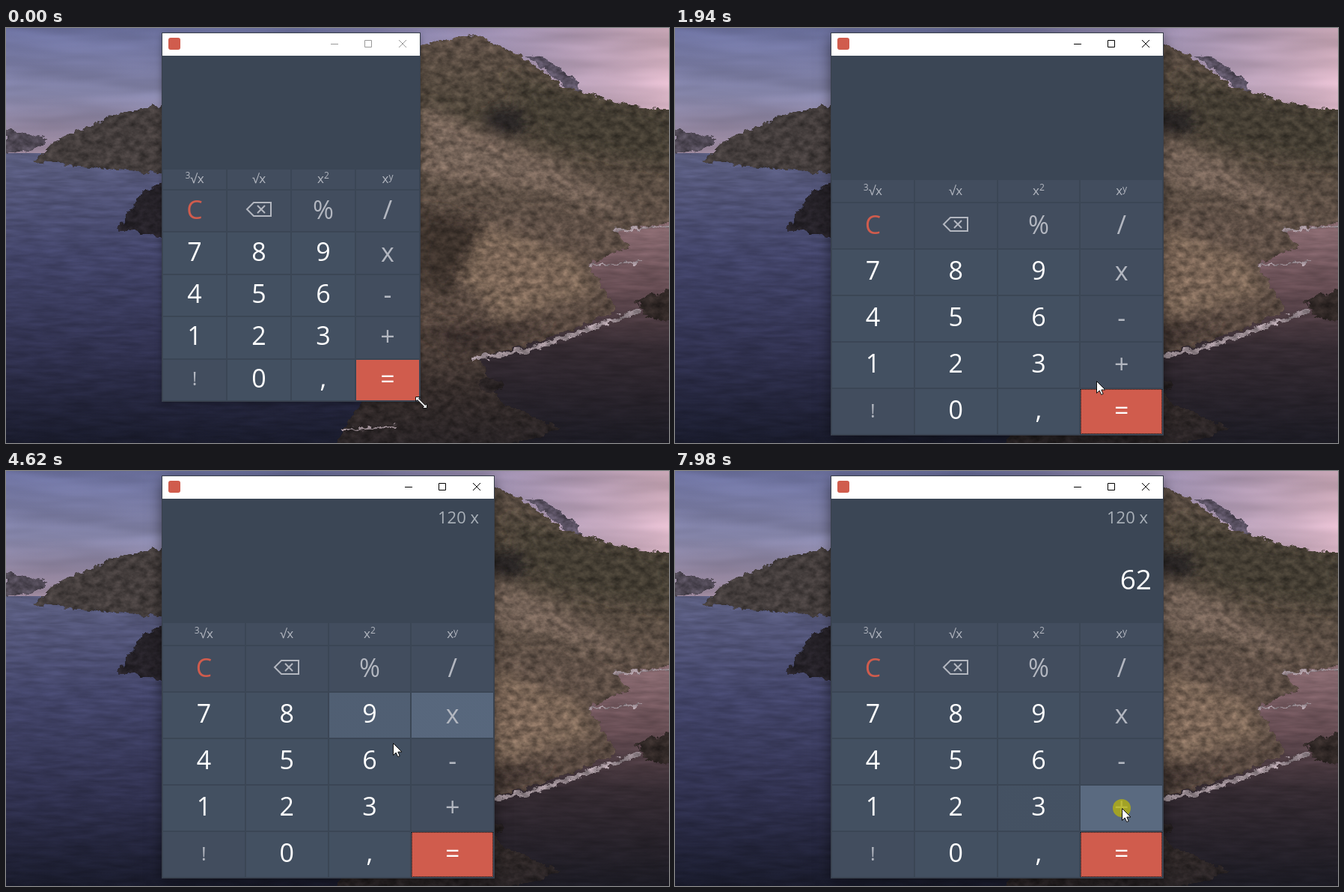
Recreate the animation shown at these times as an HTML page. Size 886 px wide and 554 px high, loop 8 s.

```html
<!DOCTYPE html>
<html lang="en">
<head>
<meta charset="utf-8">
<title>Calculator</title>
<style>
html, body { margin: 0; width: 100%; height: 100%; overflow: hidden; }
body { position: relative; background: #33364f; font-family: "Open Sans", "Noto Sans", "DejaVu Sans", sans-serif; }
svg { display: block; }
#scene { position: absolute; left: 0; top: 0; will-change: transform; }
#win {
  position: absolute; left: 209px; top: 7px; background: #3b4655;
  outline: 1px solid #39404c; box-shadow: 0 2px 9px rgba(0,0,0,.4);
}
#win.active { box-shadow: 0 4px 18px rgba(0,0,0,.55); }
#bar { position: relative; height: 30px; background: #fff; }
#icon { position: absolute; left: 8px; top: 6px; width: 16px; height: 16px; border-radius: 3px; background: #d05c4d; }
#buttons { position: absolute; right: 18px; top: 8px; fill: none; stroke: #999; overflow: visible; }
.active #buttons { stroke: #000; }
#grid {
  position: absolute; inset: 30px 0 0; display: grid;
  grid-template: 32.7fr 6.1fr repeat(5, 12.24fr) / repeat(4, 1fr);
}
#display { grid-column: 1 / 5; min-height: 0; }
#value, #history { position: absolute; white-space: pre; }
#value { right: 15px; top: 87px; font-size: 37px; line-height: 40px; color: #fff; }
#history { right: 20px; top: 12px; font-size: 22px; line-height: 24px; color: #a9b0b8; }
.key {
  --h: 0; margin: 1px; min-width: 0; min-height: 0; box-sizing: border-box; padding-bottom: 4px;
  display: flex; align-items: center; justify-content: center;
  font-size: 34px; line-height: 1; color: #b3b7c0; background: #424d5e;
  background-image: linear-gradient(rgba(90,106,128,var(--h)), rgba(90,106,128,var(--h)));
}
.digit { color: #fff; background-color: #435061; padding-bottom: 6px; }
.small { font-size: 17px; padding-bottom: 2px; }
.small sup { font-size: 12px; line-height: 0; vertical-align: 6px; }
.small sup.low { vertical-align: 4px; }
.clear { color: #d05c4d; }
.fact { font-size: 25px; }
.equals { color: #fff; background: #d05c4d; }
.active .equals { outline: 1px dotted #111; outline-offset: -1px; }
#pointer { position: absolute; left: 0; top: 0; width: 0; height: 0; }
#pointer svg { position: absolute; left: -20px; top: -20px; }
</style>
</head>
<body>
<svg id="scene" width="886" height="554" viewBox="0 0 886 554">
  <defs>
    <linearGradient id="sky" x2="0" y2="1">
      <stop stop-color="#6a6f9c"/><stop offset=".5" stop-color="#8484a8"/><stop offset="1" stop-color="#a891a5"/>
    </linearGradient>
    <linearGradient id="dusk">
      <stop stop-color="#b79cb6" stop-opacity="0"/><stop offset="1" stop-color="#d0adbd"/>
    </linearGradient>
    <linearGradient id="sea" x2="0" y2="1">
      <stop stop-color="#5c5f82"/><stop offset=".35" stop-color="#43456a"/><stop offset=".7" stop-color="#30314f"/><stop offset="1" stop-color="#191b2c"/>
    </linearGradient>
    <linearGradient id="bay" x2="0" y2="1">
      <stop stop-color="#96757b"/><stop offset=".35" stop-color="#664d53"/><stop offset=".6" stop-color="#352b32"/><stop offset="1" stop-color="#1c1b24"/>
    </linearGradient>
    <linearGradient id="land" x2="0" y2="1">
      <stop stop-color="#625349"/><stop offset=".2" stop-color="#50473b"/><stop offset=".45" stop-color="#64544a"/>
      <stop offset=".7" stop-color="#5c4c43"/><stop offset=".85" stop-color="#372e2c"/><stop offset="1" stop-color="#282326"/>
    </linearGradient>
    <filter id="rock" x="0" y="0" width="886" height="554" filterUnits="userSpaceOnUse" color-interpolation-filters="sRGB">
      <feTurbulence type="fractalNoise" baseFrequency=".09 .12" numOctaves="4" seed="7" result="noise"/>
      <feDisplacementMap in="SourceGraphic" in2="noise" scale="12" xChannelSelector="R" yChannelSelector="G" result="rough"/>
      <feColorMatrix in="noise" values="1.2 0 0 0 -.1  1.2 0 0 0 -.1  1.2 0 0 0 -.1  0 0 0 0 1"/>
      <feComposite in2="rough" operator="arithmetic" k1=".7" k3=".6"/>
      <feComposite in2="rough" operator="in"/>
    </filter>
    <filter id="waves" x="0" y="0" width="886" height="554" filterUnits="userSpaceOnUse" color-interpolation-filters="sRGB">
      <feTurbulence type="fractalNoise" baseFrequency=".025 .16" numOctaves="3" seed="3"/>
      <feColorMatrix values="1 0 0 0 0  1 0 0 0 0  1 0 0 0 0  0 0 0 0 1"/>
      <feComposite in2="SourceGraphic" operator="arithmetic" k1=".35" k3=".82"/>
      <feComposite in2="SourceGraphic" operator="in"/>
    </filter>
    <filter id="clouds" x="0" y="0" width="886" height="200" filterUnits="userSpaceOnUse" color-interpolation-filters="sRGB">
      <feTurbulence type="fractalNoise" baseFrequency=".005 .035" numOctaves="3" seed="12"/>
      <feColorMatrix values="1 0 0 0 0  1 0 0 0 0  1 0 0 0 0  0 0 0 0 1"/>
      <feComposite in2="SourceGraphic" operator="arithmetic" k1=".3" k3=".85"/>
    </filter>
    <filter id="soft" x="-30%" y="-30%" width="160%" height="160%"><feGaussianBlur stdDeviation="9"/></filter>
    <path id="coast" d="M530 27L625 8 690 38 745 78 840 105 900 111V258L812 270 835 290 780 315 818 378 700 423 630 438 662 500 742 534 640 570H430L480 490 530 470z"/>
    <clipPath id="ashore"><use href="#coast"/></clipPath>
  </defs>
  <g filter="url(#clouds)">
    <path fill="url(#sky)" d="M0 0H886V175H0z"/>
    <path fill="url(#dusk)" d="M400 0H886V130H400z"/>
  </g>
  <g filter="url(#waves)">
    <path fill="url(#sea)" d="M0 167H560V554H0z"/>
    <path fill="url(#bay)" d="M540 235H886V554H540z"/>
  </g>
  <g filter="url(#rock)">
    <path fill="#524b58" d="M0 137H12L55 149 38 163 0 168z"/>
    <path fill="#47403f" d="M38 178L62 153 145 115 215 101V194L120 187z"/>
    <path fill="#28242b" d="M149 268L184 217 215 205V281L172 272z"/>
    <path fill="#5e5567" d="M695 37L717 38 764 72 770 95z"/>
    <use href="#coast" fill="url(#land)"/>
    <g clip-path="url(#ashore)"><g filter="url(#soft)">
      <path fill="#474134" d="M670 60L760 90 890 114V185L720 150z"/>
      <ellipse fill="#2c2725" cx="668" cy="125" rx="30" ry="20"/>
      <path fill="#7a675b" d="M553 100L735 180 850 250 700 215 553 200z"/>
      <path fill="#806a5a" d="M640 260L765 305 790 355 660 390 600 320z"/>
      <path fill="#40352f" d="M553 240L645 260 590 365 553 330z"/>
      <path fill="#3d322e" d="M553 400L735 390 610 437z"/>
    </g></g>
    <path fill="#332a28" d="M841 362L895 349V394L856 385z"/>
    <ellipse fill="#2c2526" cx="648" cy="476" rx="16" ry="9"/>
  </g>
  <g filter="url(#rock)" fill="none" stroke="#a2939a" stroke-linecap="round">
    <path stroke-width="6" d="M625 441L700 430 790 397 845 378"/>
    <path stroke-width="3" d="M812 270L886 264M780 317L850 312M450 537L520 532"/>
  </g>
</svg>

<div id="win">
  <div id="bar">
    <i id="icon"></i>
    <svg id="buttons" width="104" height="13"><path d="M3 6.500h10M48.500 1.500h9v9h-9zM94 1l10 10M104 1l-10 10"/></svg>
  </div>
  <div id="grid"><div id="display"><span id="history"></span><span id="value"></span></div></div>
</div>

<div id="pointer">
  <svg width="44" height="44" viewBox="-20 -20 44 44">
    <circle id="press" r="12" fill="rgba(192,187,0,.7)"/>
    <path id="arrow" d="M.5.5V16.500L4.200 13 6.700 18.500 9.200 17.400 6.800 12H12z" fill="#fff" stroke="#111"/>
    <path id="resize" d="M-7.500 -7.500H-1.500L-3.500 -5.200 5.200 3.500 7.500 1.500V7.500H1.500L3.500 5.200 -5.200 -3.500 -7.500 -1.500z" fill="#fff" stroke="#111"/>
  </svg>
</div>

<script>
const LOOP = 8000, LEFT = 209, TOP = 7, BAR = 30;
const DISPLAY = .327, KEYS = .388, ROW = .1224;   // shares of the client height
const $ = id => document.getElementById(id);

const names = [...'∛√²ʸC⌫%/789x456-123+!0,='];
const markup = {
  '∛': '<span><sup>3</sup>√x</span>',
  '√': '√x',
  '²': '<span>x<sup>2</sup></span>',
  'ʸ': '<span>x<sup class="low">y</sup></span>',
  '⌫': '<svg width="36" height="22" fill="none" stroke="currentColor" stroke-width="2"><path d="M2 11L11 2H34V20H11zM16 6l10 10M26 6l-10 10"/></svg>'
};
const kinds = { C: 'clear', '!': 'fact', '=': 'equals', ',': 'digit' };
const keys = names.map((name, i) => {
  const key = document.createElement('div');
  key.className = 'key ' + (i < 4 ? 'small' : /\d/.test(name) ? 'digit' : kinds[name] || '');
  key.innerHTML = markup[name] || name;
  $('grid').append(key);
  return key;
});

// Dragging the corner: time, width, height.
const drag = [[200, 344, 491], [670, 400, 506], [1350, 443, 536]];
const [, WIDTH, HEIGHT] = drag[drag.length - 1];
const RELEASE = 1700;

// Keys the pointer visits; "shows" is the display after the click.
const visit = (name, arrive, click, leave, shows) => {
  const i = names.indexOf(name), row = Math.floor(i / 4);
  return {
    name, arrive, click, leave, shows,
    x: LEFT + (i % 4 + .5) * WIDTH / 4,
    y: TOP + BAR + (HEIGHT - BAR) * (KEYS + (row - .5) * ROW)
  };
};
const tour = [
  visit('5', 2290, 2560, 2660, '5'),
  visit('!', 3060, 3280, 3300, '120'),
  visit('x', 3740, 4100, 4300, ''),
  visit('6', 4810, 4920, 5380, '6'),
  visit('8', 5580, 5640, 5860, '68'),
  visit('⌫', 6080, 6280, 6300, '6'),
  visit('2', 6510, 7180, 7300, '62'),
  visit('+', 7700, 7990, LOOP, '62')
];
const stops = [{ arrive: 0, leave: RELEASE, x: LEFT + WIDTH + 3, y: TOP + HEIGHT + 3 }, ...tour];

const clamp = v => Math.min(1, Math.max(0, v));
const smooth = k => k * k * (3 - 2 * k);

function windowSize(t) {
  const next = Math.max(1, drag.findIndex(d => d[0] > t));
  const [a, b] = t >= RELEASE ? drag.slice(-2) : [drag[next - 1], drag[next]];
  const [from, to] = t > drag[2][0] ? drag.slice(-2) : [a, b];
  const k = clamp((t - from[0]) / (to[0] - from[0]));
  return [1, 2].map(i => from[i] + (to[i] - from[i]) * k);
}

// The hand swings slightly to the right of the straight line between two keys.
function pointerAt(t) {
  if (t < RELEASE) {
    const [w, h] = windowSize(t);
    return [LEFT + w + 2, TOP + h + 2];
  }
  const i = stops.filter(s => s.arrive <= t).length - 1;
  const from = stops[i], to = stops[i + 1] || from;
  const k = t <= from.leave ? 0 : smooth((t - from.leave) / (to.arrive - from.leave));
  const dx = to.x - from.x, dy = to.y - from.y, swing = .07 * Math.sin(Math.PI * k);
  return [from.x + dx * k - dy * swing, from.y + dy * k + dx * swing];
}

function keyAt(t) {
  if (t < RELEASE) return -1;
  const [x, y] = pointerAt(t);
  const col = Math.floor((x - LEFT) / WIDTH * 4), f = (y - TOP - BAR) / (HEIGHT - BAR);
  if (f < DISPLAY || f >= 1 || col < 0 || col > 3) return -1;
  return (f < KEYS ? 0 : 1 + Math.floor((f - KEYS) / ROW)) * 4 + col;
}

// Keys light up quickly under the pointer and fade slowly after it leaves.
function glows(t) {
  const level = keys.map(() => 0), step = 10, lag = 40;
  for (let s = t - 900; s <= t; s += step) {
    const hit = keyAt(s - lag);
    level.forEach((v, i) => { level[i] = clamp(v + (i === hit ? step / 70 : -step / 400)); });
  }
  return level;
}

function draw(t) {
  const [w, h] = windowSize(t).map(Math.round), [x, y] = pointerAt(t).map(Math.round);
  const done = tour.filter(s => s.click <= t), last = done[done.length - 1];
  const pressed = t < RELEASE ? t >= 150 && t < 1450 : tour.some(s => Math.abs(t - s.click) < 60);
  $('win').style.width = w + 'px';
  $('win').style.height = h + 'px';
  $('win').classList.toggle('active', t >= 150);
  $('value').textContent = last ? last.shows : '';
  $('history').textContent = done.some(s => s.name === 'x') ? '120 x' : '';
  glows(t).forEach((v, i) => keys[i].style.setProperty('--h', v.toFixed(3)));
  $('pointer').style.transform = `translate(${x}px,${y}px)`;
  $('press').style.display = pressed ? '' : 'none';
  $('resize').style.display = t < RELEASE ? '' : 'none';
  $('arrow').style.display = t < RELEASE ? 'none' : '';
}

const start = performance.now();
function tick() {
  draw((performance.now() - start) % LOOP);
  requestAnimationFrame(tick);
}
draw(0);
requestAnimationFrame(tick);
</script>
</body>
</html>
```
